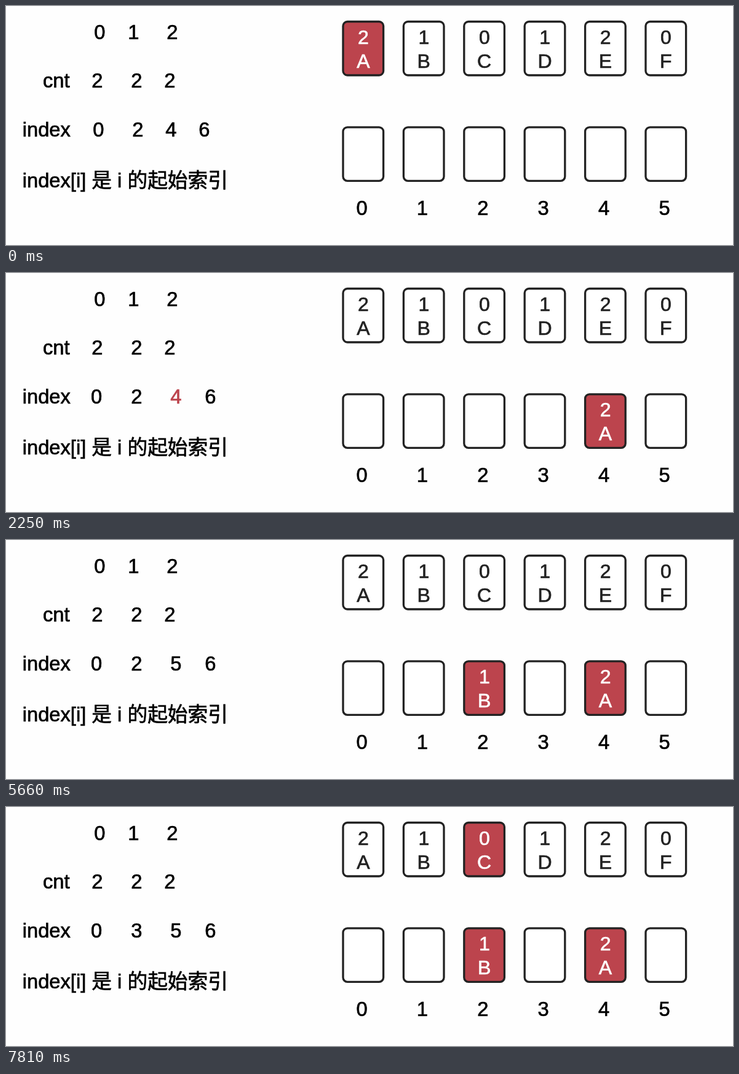
Recreate the animation shown at these times as an HTML page with a canvas. Size 1182 px wide and 390 px high, loop 8 s.

```html
<!DOCTYPE html>
<html lang="zh">
<head>
<meta charset="utf-8">
<title>Counting sort</title>
<style>
html, body { margin: 0; width: 100%; height: 100%; overflow: hidden; background: #fefefe; }
canvas { display: block; }
</style>
</head>
<body>
<canvas id="stage" width="1182" height="390"></canvas>
<script>
const ctx = document.getElementById('stage').getContext('2d');
const RED = '#bc444d', INK = '#222', PITCH = 98.4;
const cards = ['2A', '1B', '0C', '1D', '2E', '0F'];

// Each step lists the picked card, placed cards by slot, index values and the red value.
const steps = [
  { at: 0, pick: 0, placed: {}, index: [0, 2, 4, 6], initial: true },
  { at: 1170, placed: { 4: '2A' }, index: [0, 2, 4, 6], initial: true },
  { at: 2250, placed: { 4: '2A' }, index: [0, 2, 4, 6], red: 2 },
  { at: 3420, placed: { 4: '2A' }, index: [0, 2, 5, 6], red: 2 },
  { at: 4680, pick: 1, placed: { 4: '2A' }, index: [0, 2, 5, 6] },
  { at: 5660, placed: { 2: '1B', 4: '2A' }, index: [0, 2, 5, 6] },
  { at: 6830, placed: { 2: '1B', 4: '2A' }, index: [0, 3, 5, 6], red: 1 },
  { at: 7810, pick: 2, placed: { 2: '1B', 4: '2A' }, index: [0, 3, 5, 6] }
];

// A thin outline gives the letters a slightly heavier weight.
function text(str, x, y, color = '#000', size = 32.7, align = 'center') {
  ctx.font = `${size}px "Liberation Sans", "Noto Sans CJK SC", "Noto Sans CJK", sans-serif`;
  ctx.textAlign = align;
  ctx.fillStyle = ctx.strokeStyle = color;
  ctx.lineWidth = 0.7;
  ctx.fillText(str, x, y);
  ctx.strokeText(str, x, y);
}

function label(str, x, y) {
  text(str, x, y, '#000', 32.7, 'left');
}

function row(values, xs, y, red) {
  values.forEach((v, i) => text(v, xs[i], y, i === red ? RED : '#000'));
}

function card(i, y, content, active) {
  const x = 548 + i * PITCH;
  ctx.beginPath();
  ctx.roundRect(x, y, 65.6, 87.5, 7);
  ctx.fillStyle = active ? RED : '#fff';
  ctx.fill();
  ctx.strokeStyle = INK;
  ctx.lineWidth = 3.3;
  ctx.stroke();
  if (!content) return;
  const color = active ? '#fff' : INK;
  text(content[0], x + 33, y + 36.5, color, 32);
  text(content[1], x + 32.8, y + 75, color, 32);
}

function draw(step) {
  ctx.fillStyle = '#fefefe';
  ctx.fillRect(0, 0, 1182, 390);

  row([0, 1, 2], [152.4, 207.4, 270.4], 54);
  label('cnt', 60, 133);
  row([2, 2, 2], [148.4, 212.4, 266.4], 133);
  label('index', 26.7, 213);
  row(step.index, step.initial ? [150.4, 214.4, 268.4, 322.4] : [147, 212.4, 276.4, 332.4], 213, step.red);
  label('index[i] 是 i 的起始索引', 26.7, 296);

  cards.forEach((content, i) => {
    card(i, 25.5, content, i === step.pick);
    card(i, 197.8, step.placed[i], i in step.placed);
    text(i, 578.5 + i * PITCH, 341);
  });
}

function frame() {
  const t = performance.now() % 8000;
  draw(steps.findLast(s => s.at <= t));
  requestAnimationFrame(frame);
}
frame();
</script>
</body>
</html>
```
